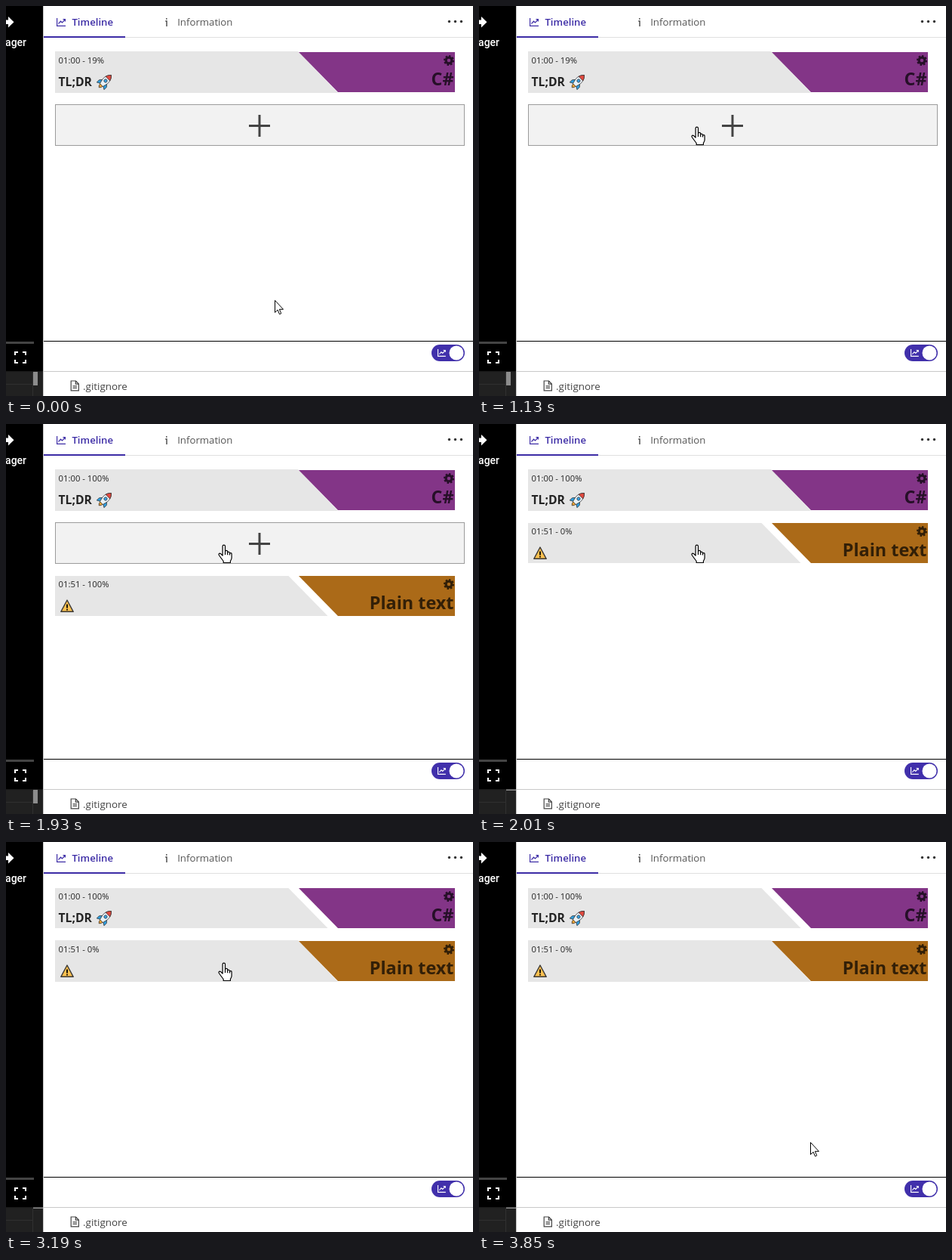
An HTML page for the animation above (3.93 s loop, 619 by 516 pixels).

```html
<!DOCTYPE html>
<html lang="en">
<head>
<meta charset="utf-8">
<title>Timeline</title>
<style>
  html, body { margin: 0; width: 100%; height: 100%; overflow: hidden; background: #fff; }
  svg { display: block; width: 100%; height: 100%; font: 13.2px "Open Sans", "Noto Sans", sans-serif; fill: #242424; }
  .line { fill: none; stroke: currentColor; }
  .time { font-size: 11.3px; }
  .title { font-size: 15.7px; font-weight: 700; }
  .lang { font-size: 23.4px; font-weight: 700; text-anchor: end; }
  .ink { fill: #000; color: #000; opacity: .7; }
  .tab { fill: #3d2da6; color: #3d2da6; font-weight: 600; }
</style>
</head>
<body>
<svg viewBox="0 0 619 516">
  <defs>
    <path id="chart" class="line" stroke-width="1.2" d="M.6 0V10.4H12M2.5 7.5 5.5 4.2 7.5 6 11.3 1.8M8.5 1.6H11.4V4.5"/>
    <g id="gear" class="line">
      <circle r="3.9" stroke-width="3.2"/>
      <circle r="5.8" stroke-width="2.4" pathLength="16" stroke-dasharray="1.1 .9"/>
    </g>
    <g id="rocket" stroke="#333" stroke-width=".8" stroke-linejoin="round">
      <path fill="#f7a434" d="M-2.5 6Q-3 10 0 12Q3 10 2.5 6z"/>
      <path fill="#2f9fe0" d="M-4 0-7.5 4V9L-3 6.5zM4 0 7.5 4V9L3 6.5z"/>
      <path fill="#e8f1f7" d="M0-13Q5.5-8 4.8 0L3 7H-3L-4.8 0Q-5.5-8 0-13z"/>
      <path fill="#e2493f" d="M0-13Q3.6-10 4.4-6H-4.4Q-3.6-10 0-13z"/>
      <circle cy="-1.5" r="2.3" fill="#3aa5e8"/>
    </g>
    <g id="warning">
      <path fill="#fcc04f" stroke="#3b3936" stroke-width="1.4" stroke-linejoin="round" d="M81 32 89.2 47.3H72.8z"/>
      <path class="line" stroke-width="1.8" d="M81 37.5V42.4M81 43.8V45.5"/>
    </g>
  </defs>

  <!-- dark side panel -->
  <path d="M0 0H49V516H0z" fill="#000"/>
  <path d="M0 484.5H49V516H0z" fill="#212121"/>
  <path class="line" color="#303030" d="M0 484H49M0 500.5H35M35.5 485V516"/>
  <path fill="#fff" d="M0 18.5H3V14L10.5 21.3 3 28.5V24H0z"/>
  <text x="27" y="52.5" fill="#fff" text-anchor="end" style="font:500 14px Roboto,sans-serif">ager</text>
  <path fill="#444" d="M0 444H37V447H0z"/>
  <path class="line" color="#fff" stroke-width="2" d="M12 462V458H16M22 458H26V462M26 468V472H22M16 472H12V468"/>
  <path id="handle" fill="#8c8c8c" d="M36 484H42V502H36z"/>
  <path id="edge" fill="#8c8c8c" d="M36 483.5H49V485H36z"/>
  <path class="line" color="#c8c8c8" d="M49.5 0V516M50 483.5H619"/>

  <!-- tabs -->
  <path class="line" color="#e0e0e0" d="M50 41.5H619"/>
  <path fill="#3d2da6" d="M50 40H158V42H50z"/>
  <g class="tab">
    <use href="#chart" x="67" y="16"/>
    <text x="87.4" y="26">Timeline</text>
  </g>
  <path class="line" color="#444" stroke-width="1.4" d="M212.8 16V17.7M211.3 20H213V27"/>
  <text x="227.2" y="26" fill="#555">Information</text>
  <g fill="#333"><circle cx="587.5" cy="20.5" r="1.7"/><circle cx="595.5" cy="20.5" r="1.7"/><circle cx="603.5" cy="20.5" r="1.7"/></g>

  <g id="cards"></g>
  <g id="add">
    <path fill="#f2f2f2" d="M65 130H608V185H65z"/>
    <rect class="line" color="#444" x="65.5" y="130.5" width="542" height="54" stroke-dasharray="1 1"/>
    <path class="line" color="#444" stroke-width="3" d="M322 158.5H350M336 144V173"/>
  </g>

  <!-- footer -->
  <path class="line" color="#000" d="M50 443.5H619"/>
  <rect x="564" y="448" width="44" height="22" rx="11" fill="#4130ab"/>
  <circle cx="597" cy="459" r="9.5" fill="#fff"/>
  <use href="#chart" transform="translate(572 454) scale(.9)" color="#fff"/>
  <path class="line" color="#444" stroke-width="1.2" d="M86.2 496H92.5L96.4 500V508.8H86.2zM92.3 496V500.2H96.4M88.5 502.8H94M88.5 505.4H94"/>
  <text x="102" y="508" fill="#444" style="font-size:13.4px">.gitignore</text>

  <g id="cursor" stroke="#000" fill="#fff" stroke-linejoin="round">
    <path id="arrow" d="M0 0V16L3.6 12.6 6 18.3 8.3 17.3 5.9 11.8H11z"/>
    <path id="hand" stroke-width="1.2" d="M-2.4 13.5V1.3a1.7 1.7 0 0 1 3.4 0V8.3a1.6 1.6 0 0 1 3.2 .3V9.5a1.5 1.5 0 0 1 2.8 .5v.8a1.4 1.4 0 0 1 2.6 .6V16.5q0 2-1.7 4.3V23H-1.3V21q-2-2.5-5.9-8q-.8-2 .9-2.4q1.3 0 2.5 1.6zM1 8.3V12.5M4.2 9.5V12.8M7 10.8V13"/>
  </g>
</svg>
<script>
const LOOP = 3930, CARD_ADDED = 1790, ADD_CLOSED = 2010, SELECTED = 2090;
const WIDE = 'M65-1H387L440 54H65z', NARROW = 'M65 0H374.5L426.5 53H65z';
const $ = id => document.getElementById(id);

const card = (color, lang, content) => `<g>
  <path fill="#e6e6e6"/>
  <path fill="${color}" d="M388 0H595V53H440z"/>
  <text class="time" x="69.5" y="15"></text>${content}
  <g class="ink"><use href="#gear" x="587" y="11"/><text class="lang" x="593.5" y="43.7">${lang}</text></g></g>`;

$('cards').innerHTML =
  card('#833587', 'C#', '<text class="title" x="69.5" y="45">TL;DR</text><use href="#rocket" transform="translate(131 39) rotate(45) scale(.92)"/>') +
  card('#ab6a18', 'Plain text', '<use href="#warning"/>');
const [first, second] = $('cards').children;

const show = (el, on) => el.setAttribute('display', on ? 'inline' : 'none');

function setCard(el, y, active, time) {
  el.setAttribute('transform', `translate(0 ${y})`);
  el.firstElementChild.setAttribute('d', active ? WIDE : NARROW);
  el.querySelector('.time').textContent = time;
}

// Smooth progress from 0 to 1 between two times
function ease(t, from, to) {
  const u = Math.min(1, Math.max(0, (t - from) / (to - from)));
  return u * u * (3 - 2 * u);
}

function draw(t) {
  const added = t >= CARD_ADDED, closed = t >= ADD_CLOSED, selected = t >= SELECTED;
  setCard(first, 61, !selected, added ? '01:00 - 100%' : '01:00 - 19%');
  setCard(second, closed ? 131 : 201, selected, closed ? '01:51 - 0%' : '01:51 - 100%');
  show(second, added);
  show($('add'), !closed);
  show($('handle'), !closed);
  show($('edge'), closed);

  const arrive = ease(t, 80, 680), leave = ease(t, 3440, 3850);
  const x = Math.round(356 - 67 * arrive + 150 * leave);
  const y = Math.round(389 - 229 * arrive + 237 * leave);
  const over = y < 185;
  $('cursor').setAttribute('transform', `translate(${x + .5} ${y + .5})`);
  show($('hand'), over);
  show($('arrow'), !over);
}

function tick() {
  draw(performance.now() % LOOP);
  requestAnimationFrame(tick);
}
tick();
</script>
</body>
</html>
```
